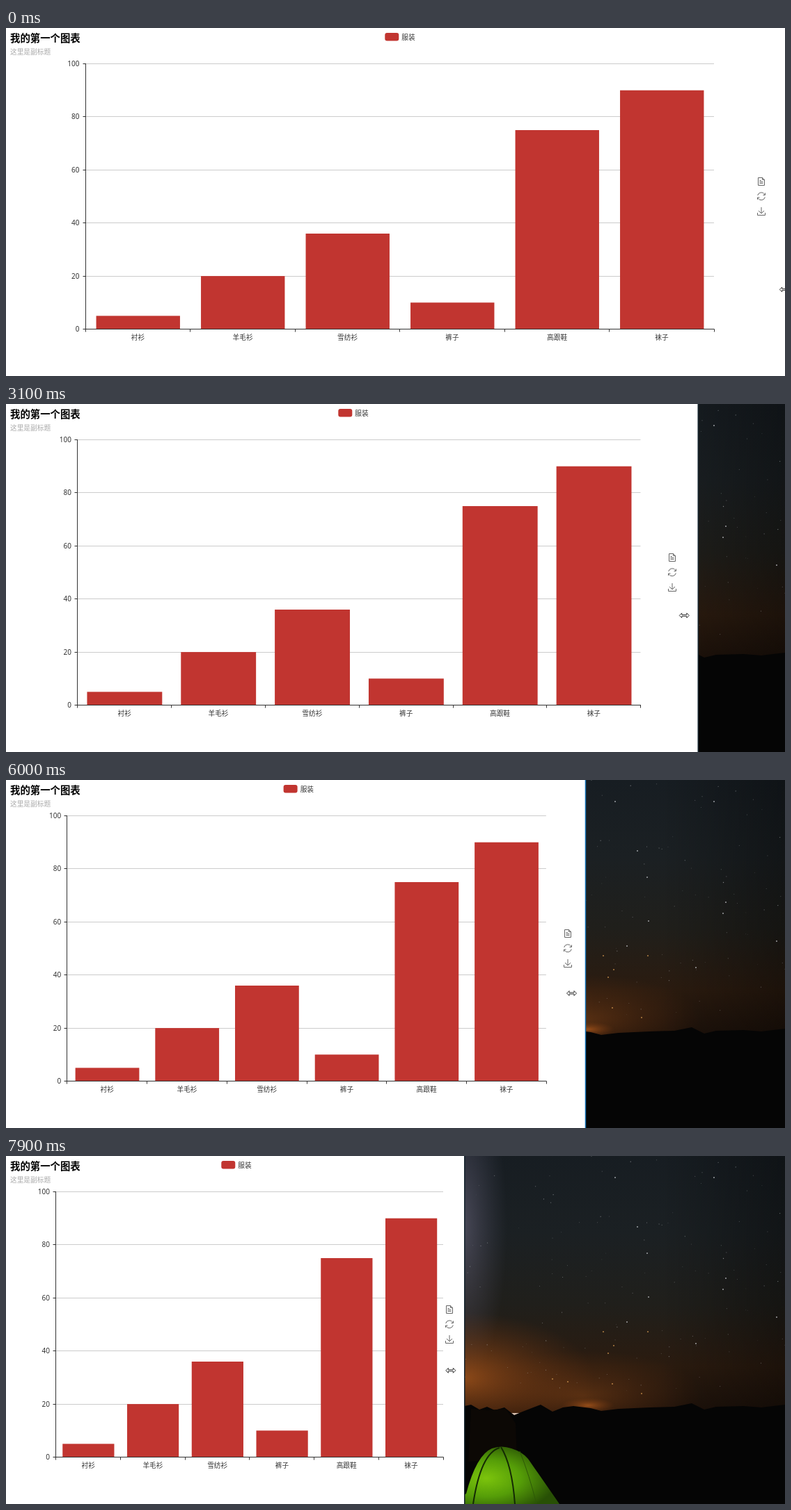
An HTML page for the animation above (8 s loop, 1119 by 501 pixels).

```html
<!DOCTYPE html>
<html lang="zh-CN">
<head>
<meta charset="utf-8">
<title>图表</title>
<style>
html, body { margin: 0; width: 100%; height: 100%; overflow: hidden; background: #fff; }
svg { display: block; width: 1119px; height: 501px; }
text { font-family: "Noto Sans CJK SC", "Noto Sans CJK", "Noto Sans", sans-serif; font-size: 9.7px; fill: #333; }
.num { font-family: "Noto Sans", sans-serif; font-size: 10px; text-anchor: end; }
.cat { text-anchor: middle; }
.icon path { fill: none; stroke: #666; }
</style>
</head>
<body>
<svg id="stage" viewBox="0 0 1119 501">
  <defs>
    <linearGradient id="sky" x1="0" y1="0" x2="0" y2="1">
      <stop offset="0" stop-color="#171d22"/>
      <stop offset=".3" stop-color="#1b2023"/>
      <stop offset=".58" stop-color="#201f1b"/>
      <stop offset=".82" stop-color="#2b1b0f"/>
      <stop offset="1" stop-color="#1c110a"/>
    </linearGradient>
    <linearGradient id="dim" x1="0" y1="0" x2="1" y2="0">
      <stop offset="0" stop-color="#000" stop-opacity="0"/>
      <stop offset="1" stop-color="#000" stop-opacity=".35"/>
    </linearGradient>
    <radialGradient id="haze">
      <stop offset="0" stop-color="#7a7590" stop-opacity=".5"/>
      <stop offset="1" stop-color="#5a5870" stop-opacity="0"/>
    </radialGradient>
    <radialGradient id="glow">
      <stop offset="0" stop-color="#b05a1c" stop-opacity=".75"/>
      <stop offset="1" stop-color="#7a3a12" stop-opacity="0"/>
    </radialGradient>
    <radialGradient id="cloth" cx=".32" cy=".55" r=".65">
      <stop offset="0" stop-color="#7cc40c"/>
      <stop offset=".5" stop-color="#559d08"/>
      <stop offset="1" stop-color="#285005"/>
    </radialGradient>
  </defs>

  <g id="photo">
    <rect x="640" width="479" height="370" fill="url(#sky)"/>
    <ellipse cx="655" cy="100" rx="65" ry="230" fill="url(#haze)"/>
    <ellipse cx="655" cy="320" rx="190" ry="95" fill="url(#glow)"/>
    <ellipse cx="830" cy="345" rx="170" ry="65" fill="url(#glow)" opacity=".5"/>
    <ellipse cx="836" cy="359" rx="38" ry="11" fill="url(#glow)"/>
    <rect x="940" width="179" height="370" fill="url(#dim)"/>
    <g id="stars"></g>
    <path fill="#050505" d="M640 501V364L668 358 680 365 691 361 702 366 716 362 730 373 742 368 768 358 785 368 800 362 815 360 840 363 855 367 880 364 925 362 960 361 985 356 1003 365 1020 361 1060 360 1085 362 1119 358V501Z"/>
    <path fill="#0c0805" d="M664 440L668 364 692 366 718 364 732 385 734 435Z"/>
    <path fill="url(#cloth)" d="M640 501L661 486Q676 430 698 421 712 416 726 421 742 426 750 436L795 501Z"/>
    <path fill="none" stroke="#142a04" stroke-width="2" d="M711 419Q727 445 731 501M709 420Q682 428 671 501"/>
    <path fill="none" stroke="#2d5807" d="M738 425Q752 460 762 501"/>
  </g>

  <rect id="page" height="501" fill="#fff"/>
  <rect id="edge" width="1.5" height="501"/>

  <text x="6" y="20.3" style="font-size:14.4px;font-weight:700;fill:#000">我的第一个图表</text>
  <text x="6" y="38.3" style="fill:#aaa">这里是副标题</text>
  <g id="legend">
    <rect y="7" width="20" height="11.5" rx="3" fill="#c13530"/>
    <text x="24" y="16.7">服装</text>
  </g>
  <g id="chart"></g>
  <g id="tools" class="icon">
    <path d="M-4.500 215.500H1.500L4.500 218.500V226.500H-4.500ZM1.500 215.500V218.500H4.500M-2.500 219.500H0M-2.500 221.500H2.500M-2.500 223.500H2.500"/>
    <path d="M-5.300 241A5.500 5.500 0 0 1 4.800 239.500M5.300 243.500A5.500 5.500 0 0 1-4.800 245M5.500 237.500V240.500H2.500M-5.500 247V244H-2.500"/>
    <path d="M0 258V267M-4 263L0 267 4 263M-5.500 266V269.500H5.500V266"/>
  </g>
  <path id="cursor" fill="#fff" stroke="#333" d="M-7 0L-3.500-3.500V-1H3.500V-3.500L7 0 3.500 3.500V1H-3.500V3.500Z"/>
</svg>
<script>
const $ = id => document.getElementById(id);
const set = (el, attrs) => { for (const k in attrs) el.setAttribute(k, attrs[k]); return el; };
function add(parent, tag, attrs, text) {
  const el = set(document.createElementNS($('stage').namespaceURI, tag), attrs);
  if (text !== undefined) el.textContent = text;
  return parent.appendChild(el);
}

const LOOP = 8000, STEP = 100;
const BASE = 433.5, UNIT = 3.82;
const ITEMS = [['衬衫', 5], ['羊毛衫', 20], ['雪纺衫', 36], ['裤子', 10], ['高跟鞋', 75], ['袜子', 90]];

// time, window edge, layout width, plot width
const KEYS = [
  [800, 1138, 1132, 903],
  [1500, 1093, 1106, 901],
  [1600, 1083, 1095, 878],
  [1700, 1050, 1058, 840],
  [2600, 1029, 1034, 836],
  [3100, 994, 998, 809],
  [3500, 970, 975, 789],
  [4200, 945, 948, 762],
  [4400, 931, 937, 760],
  [5300, 868, 878, 734.5],
  [6200, 822, 830, 675],
  [6800, 758, 764, 641.5],
  [7100, 755, 760, 640],
  [7900, 658.5, 662, 556.5]
];

function sample(t) {
  if (t <= KEYS[0][0]) return KEYS[0].slice(1);
  const i = Math.max(1, KEYS.findIndex(k => k[0] >= t));
  const a = KEYS[i - 1], b = KEYS[i], p = (t - a[0]) / (b[0] - a[0]);
  return a.slice(1).map((v, n) => v + (b[n + 1] - v) * p);
}

// Night sky: a seeded scatter plus the brightest stars
let seed = 11;
const rand = () => (seed = seed * 16807 % 2147483647) / 2147483647;
function star(x, y, r, opacity, fill = '#c9ccd0') {
  add($('stars'), 'circle', { cx: x, cy: y, r, fill, opacity });
}
for (let i = 0; i < 130; i++) {
  star(645 + 474 * Math.pow(rand(), 1.3), 340 * rand(), .4 + .3 * rand(), .2 + .4 * rand());
}
[[1017, 31], [1107, 232], [921, 140], [1030, 192], [1034, 176], [991, 270], [875, 31], [907, 102], [923, 203], [892, 239]]
  .forEach(([x, y]) => star(x, y, 1, .75));
[[785, 321], [873, 273], [871, 328], [913, 342], [865, 284], [858, 253], [922, 253], [807, 325]]
  .forEach(([x, y]) => star(x, y, 1, .8, '#d69a50'));

const chart = $('chart');
const line = color => add(chart, 'path', { fill: 'none', stroke: color });
const grid = line('#ccc');
const bars = ITEMS.map(([, v]) => add(chart, 'rect', {
  y: BASE - v * UNIT, height: v * UNIT, fill: '#c13530'
}));
const axes = line('#333');
const levels = [0, 20, 40, 60, 80, 100];
const levelY = v => Math.floor(BASE - v * UNIT) + .5;
const numbers = levels.map(v => add(chart, 'text', { class: 'num', y: levelY(v) + 3.6 }, v));
const names = ITEMS.map(([name]) => add(chart, 'text', { class: 'cat', y: 449.2 }, name));

function drawChart(width) {
  const left = 114 - .1227 * (903 - width), right = left + width, band = width / 6;
  const snap = x => Math.floor(x + .25) + .5;
  const x0 = snap(left);
  set(grid, { d: levels.slice(1).map(v => `M${x0} ${levelY(v)}H${right}`).join('') });
  set(axes, {
    d: `M${x0} 51V434M${x0} ${BASE}H${right + .5}`
      + levels.map(v => `M${x0 - 4} ${levelY(v)}H${x0}`).join('')
      + levels.concat(0).map((_, i) => `M${snap(left + i * band)} ${BASE}v4`).join('')
  });
  numbers.forEach(el => set(el, { x: left - 8.5 }));
  ITEMS.forEach((_, i) => {
    set(bars[i], { x: left + band * (i + .1) + .5, width: band * .8 });
    set(names[i], { x: left + band * (i + .5) + .3 });
  });
}

function cursorY(t) {
  if (t < 100) return 376.5;
  if (t < 300) return -50;
  if (t < 400) return 297.5;
  if (t < 500) return 308;
  return 303 + Math.max(0, t - 1500) * .0009;
}

function render(t) {
  const [edge, layout, plot] = sample(t);
  set($('page'), { width: edge });
  set($('edge'), { x: edge - .5, fill: t >= 5000 && t < 7200 ? '#1673b8' : '#15242e' });
  set($('legend'), { transform: `translate(${544.3 - (1132 - layout) / 2})` });
  set($('tools'), { transform: `translate(${Math.round(1085 - .953 * (1132 - layout))})` });
  set($('cursor'), { transform: `translate(${edge - 19.7} ${cursorY(t)})` });
  drawChart(plot);
}

const start = performance.now();
function tick() {
  const t = (performance.now() - start) % LOOP;
  render(Math.floor(t / STEP) * STEP);
  requestAnimationFrame(tick);
}
tick();
</script>
</body>
</html>
```
